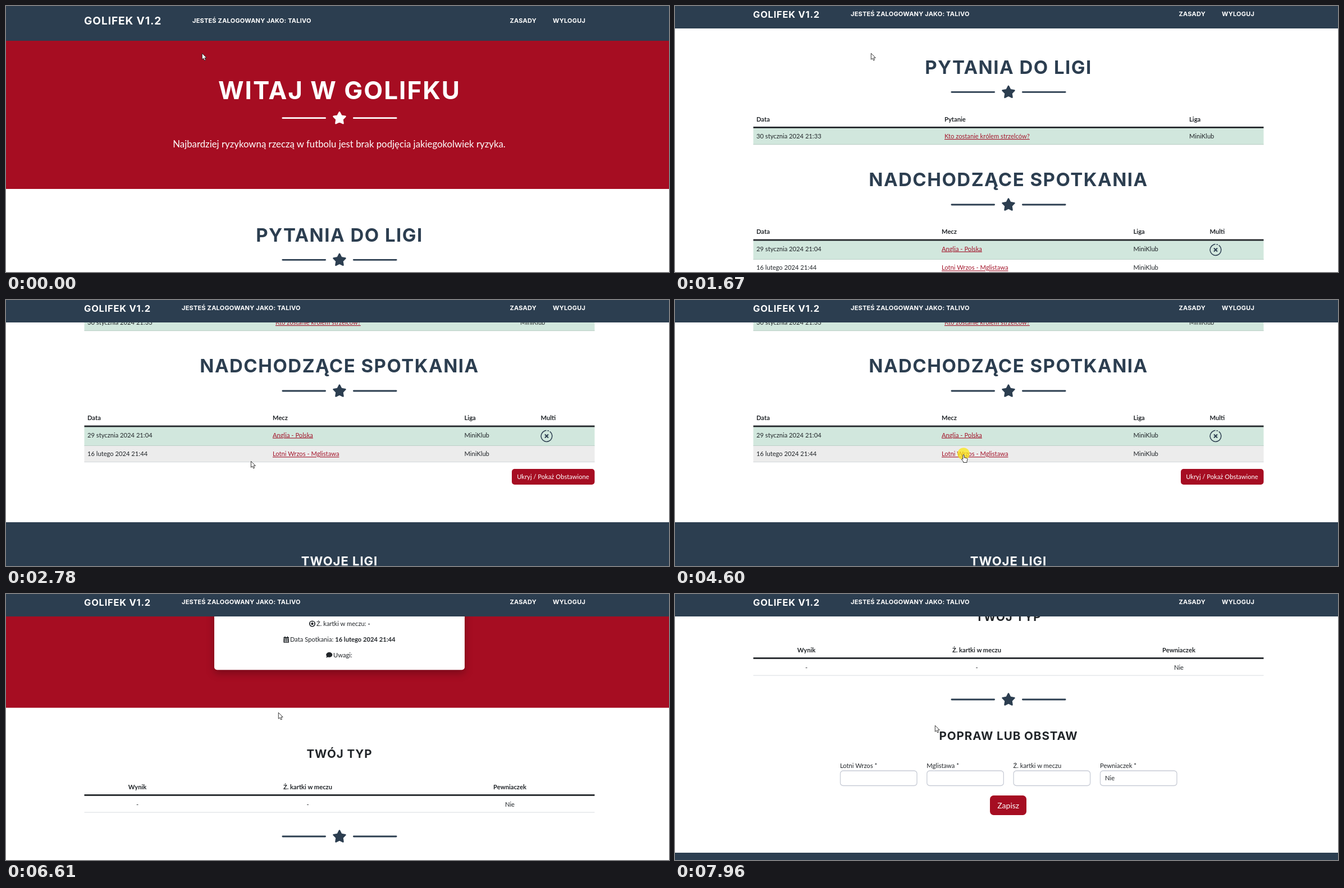
Write an HTML page that moves like this. It is 1181 by 474 pixels and loops after 8 s.

```html
<!DOCTYPE html>
<html lang="pl">
<head>
<meta charset="utf-8">
<style>
  html, body { margin: 0; height: 100%; overflow: hidden; background: #fff; }
  svg { display: block; width: 100vw; height: 100vh; }
  text { font-family: Lato, sans-serif; fill: #212529; white-space: pre; }
  .h { font-family: Inter, sans-serif; font-weight: 700; letter-spacing: .045em; }
  .n { letter-spacing: .02em; }
  .b { font-weight: 700; }
  .m { text-anchor: middle; }
  .navy { fill: #2c3e50; }
  .w { fill: #fff; }
  .a { fill: #a3142a; text-decoration: underline; }
  .red { fill: #a60d22; }
  .card { filter: drop-shadow(0 6px 7px #0004); }
</style>
</head>
<body>
<svg id="stage" viewBox="0 0 1181 474"></svg>
<script>
const LOOP = 8000, OPENED = 5010;
const NAVY = '#2c3e50', INK = '#212529';
const LEAGUE = 'MiniKlub', HOME = 'Lotni Wrzos', AWAY = 'Mglistawa';

// Markup helpers
const text = (x, y, str, cls = '', size = 11.2, id = '') =>
  `<text id="${id}" x="${x}" y="${y}" class="${cls}" font-size="${size}">${str}</text>`;
const rect = (x, y, w, h, fill, more = '') =>
  `<rect x="${x}" y="${y}" width="${w}" height="${h}" fill="${fill}" ${more}/>`;
const button = (x, y, w, h, r) => rect(x, y, w, h, '', `class="red" rx="${r}"`);
const heading = (y, str, size, cls = '') => text(594, y, str, `h m ${cls}`, size);

function divider(y, color) {
  const points = [...Array(10)].map((_, i) => {
    const r = i % 2 ? 5.7 : 11, a = (i / 5 - .5) * Math.PI;
    return [594 + r * Math.cos(a), y + .6 + r * Math.sin(a)].map(v => v.toFixed(2));
  }).join(' ');
  return rect(491.5, y - 1.4, 78.5, 2.8, color, 'rx="1.4"') +
    rect(618, y - 1.4, 78.5, 2.8, color, 'rx="1.4"') +
    `<polygon points="${points}" fill="${color}" stroke="${color}" stroke-width="2.6" stroke-linejoin="round"/>`;
}

const headLine = y => rect(139.5, y, 909, 2.8, INK);
const cells = (y, xs, words, cls) => words.map((s, i) => text(xs[i], y, s, cls)).join('');

// Table rows that react to the mouse: top, bottom, colour, hover colour, border
const rows = [
  [517, 546, '#d1e7dd', '#c9dfd5', '#bcd0c7'],
  [717, 751, '#d1e7dd', '#c9dfd5', '#bcd0c7'],
  [751, 780, '#fff', '#ececec', '#d6dadd'],
];
const rowBands = rows.map(([top, bottom, fill, , line], i) =>
  rect(139.5, top, 909, bottom - top, fill, `id="row${i}"`) +
  rect(139.5, bottom - 1, 909, 1.2, line)).join('');

const Q = [145, 480, 916], M = [145, 475, 816.5, 952.5];

const multiIcon = `<g transform="translate(963 733.5)" fill="none" stroke="${NAVY}">
  <circle r="9.9" stroke-width="1.5" stroke-dasharray="50 2 2.5 2 5.7" transform="rotate(-24)"/>
  <path d="M-3-3L3 3M3-3L-3 3" stroke-width="2"/></g>`;

const home = rect(0, 0, 1181, 326, '', 'class="red"') +
  heading(166, 'WITAJ W GOLIFKU', 44, 'w') +
  divider(199.7, '#fff') +
  text(593.5, 252, 'Najbardziej ryzykowną rzeczą w futbolu jest brak podjęcia jakiegokolwiek ryzyka.', 'm w', 16.8) +
  heading(420, 'PYTANIA DO LIGI', 33, 'navy') + divider(452.3, NAVY) +
  rowBands +
  cells(504.5, Q, ['Data', 'Pytanie', 'Liga'], 'b') + headLine(514) +
  cells(535, Q, ['30 stycznia 2024 21:33', '', LEAGUE]) +
  text(480, 535, 'Kto zostanie królem strzelców?', 'a') +
  heading(620, 'NADCHODZĄCE SPOTKANIA', 33, 'navy') + divider(653, NAVY) +
  cells(704.7, M, ['Data', 'Mecz', 'Liga', 'Multi'], 'b') + headLine(714.6) +
  cells(735.5, M, ['29 stycznia 2024 21:04', '', LEAGUE]) +
  text(475, 735.5, 'Anglia - Polska', 'a') + multiIcon +
  cells(769.3, M, ['16 lutego 2024 21:44', '', LEAGUE]) +
  text(475, 769.3, `${HOME} - ${AWAY}`, 'a') +
  button(901, 792, 147.5, 28, 5) +
  text(974.5, 810, 'Ukryj / Pokaż Obstawione', 'm w') +
  rect(0, 887, 1181, 400, NAVY) + heading(964, 'TWOJE LIGI', 22, 'w');

const ballIcon = `<g transform="translate(545.5 369)"><circle r="4.8" fill="#fff" stroke="${INK}" stroke-width="1.5"/>
  <path d="M0-2.4L2.3-.7 1.4 2H-1.4L-2.3-.7ZM-2-4.8H2L0-3.2ZM4.8-2V1.6L3.4 0ZM-4.8-2V1.6L-3.4 0ZM2 4.4L4 2.6 2.2 2.6ZM-2 4.4L-4 2.6-2.2 2.6Z" fill="${INK}"/></g>`;
const calendarIcon = rect(494.3, 393, 9.8, 9.8, INK, 'rx="1"') +
  rect(496.2, 391.5, 1.5, 3, INK) + rect(500.8, 391.5, 1.5, 3, INK) +
  `<path d="M494.3 395.6h9.8M495.3 398.2h8M495.3 400.6h8M497.6 396v6M500.8 396v6" stroke="#fff" stroke-width=".7"/>`;
const commentIcon = `<path d="M570.2 424.3a5.6 4.5 0 1 1 3 4q-1.300 1.200-3 1.200q1-1.300 .9-2.700q-.9-1.100-.9-2.500Z" fill="${INK}"/>`;

const C = [234, 537.5, 897.5], F = [294, 448.3, 602.6, 757];
const match = rect(0, 0, 1181, 518.7, '', 'class="red"') +
  heading(150, 'WYNIK MECZU', 22, 'w') + divider(186, '#fff') +
  rect(371, 236.3, 446, 215, '#fff', 'rx="5" class="card"') +
  `<path class="red" d="M372.500 269V241.300q0-3.500 3.500-3.500H812q3.500 0 3.500 3.500V269Z"/>` +
  text(478.5, 259, HOME, 'h n m w', 16.6) + text(708.5, 259, AWAY, 'h n m w', 16.6) +
  rect(474, 312, 15, 4, INK) + rect(698.5, 312, 15, 4, INK) +
  ballIcon + text(553, 373, 'Ż. kartki w meczu: <tspan class="b">-</tspan>') +
  calendarIcon + text(506, 401, 'Data Spotkania: <tspan class="b">16 lutego 2024 21:44</tspan>') +
  commentIcon + text(583, 429, 'Uwagi:') +
  heading(608, 'TWÓJ TYP', 20.6) +
  cells(663.5, C, ['Wynik', 'Ż. kartki w meczu', 'Pewniaczek'], 'b m') + headLine(673) +
  cells(694.5, C, ['-', '-', 'Nie'], 'm') + rect(139.5, 704.5, 909, 1.2, '#dee2e6') +
  divider(748, NAVY) +
  heading(820, 'POPRAW LUB OBSTAW', 20.6) +
  cells(870, F, [HOME + ' *', AWAY + ' *', 'Ż. kartki w meczu', 'Pewniaczek *']) +
  F.map(x => rect(x + .5, 875, 136.5, 26.5, '#fff', 'rx="5" stroke="#c8ccd6" stroke-width="1.3"')).join('') +
  text(766, 892, 'Nie') +
  button(561, 919, 65, 35, 6.5) + text(593.7, 942, 'Zapisz', 'm w', 14) +
  rect(0, 1021, 1181, 400, NAVY);

const nav = rect(0, 0, 1181, 62, NAVY, 'id="bar"') +
  text(139, 33, 'GOLIFEK V1.2', 'h w', 19.2, 'brand') +
  text(332, 29.5, 'JESTEŚ ZALOGOWANY JAKO: TALIVO', 'h n w link', 11, 'user') +
  text(897.5, 29.5, 'ZASADY', 'h n w link', 11) +
  text(974, 29.5, 'WYLOGUJ', 'h n w link', 11);

const cursor = `<g id="cursor" fill="#fff" stroke="#222" stroke-width=".9" stroke-linejoin="round">
  <path id="arrow" d="M.3.300V11.300L2.800 9.100 4.500 13 6.500 12.200 4.800 8.300H8.200Z"/>
  <path id="hand" d="M-1.200 1q0-1.300 1.200-1.300T1.200 1V5l1.500.1 1.700.400 1.600.600Q7 6.500 7 8L6 11.500V13.500H-.3V12L-3.200 8.500q-.7-1.200.200-1.600T-1.200 8Z"/>
  <path id="beam" d="M-2-5h1.500L0-4.500.500-5H2M0-4.500V4.500M-2 5h1.500L0 4.500.500 5H2" fill="none"/></g>`;

const stage = document.getElementById('stage');
stage.innerHTML = `<g id="home">${home}</g><g id="match">${match}</g>${nav}
  <circle id="click" cx="514" cy="274" r="10.800" fill="#fbe714" opacity=".75"/>${cursor}`;
const $ = id => document.getElementById(id);
const show = (id, on) => $(id).setAttribute('display', on ? 'inline' : 'none');
const links = document.querySelectorAll('.link');

// Keyframes: time first, then values
const homeScroll = [[1150, 0], [1300, 80], [1670, 299], [2000, 452], [2170, 491]];
const matchScroll = [[6050, 0], [6220, 96], [6610, 315], [6900, 460], [7030, 490], [7270, 490], [7500, 560]];
const mousePath = [[2400, 349, 84], [2780, 436, 287], [3180, 499, 297], [3420, 508, 252], [3660, 514, 276],
  [5500, 514, 276], [5810, 485, 211], [7860, 485, 211], [7960, 463, 234]];

function along(keys, t) {
  const i = keys.findIndex(k => k[0] > t);
  if (i === 0) return keys[0].slice(1);
  if (i < 0) return keys[keys.length - 1].slice(1);
  const [a, b] = [keys[i - 1], keys[i]], p = (t - a[0]) / (b[0] - a[0]);
  return a.slice(1).map((v, j) => v + (b[j + 1] - v) * p);
}

function draw(t) {
  const onHome = t < OPENED;
  const keys = onHome ? homeScroll : matchScroll;
  const scroll = Math.round(along(keys, t)[0]);
  const [x, y] = along(mousePath, t), pageY = y + scroll;

  show('home', onHome);
  show('match', !onHome);
  $(onHome ? 'home' : 'match').setAttribute('transform', `translate(0 ${-scroll})`);

  // The bar shrinks as soon as the page leaves its top
  const p = Math.min(1, Math.max(0, (t - keys[0][0]) / 300));
  const k = 1 - (1 - p) ** 2.5;
  $('bar').setAttribute('height', 62 - 22 * k);
  $('brand').setAttribute('y', 33 - 12.5 * k);
  $('brand').setAttribute('font-size', 19.2 - 2.7 * k);
  $('user').setAttribute('x', 332 - 19 * k);
  links.forEach(l => l.setAttribute('y', 29.5 - 11.3 * k));

  rows.forEach(([top, bottom, fill, hover], i) =>
    $('row' + i).setAttribute('fill', pageY >= top && pageY < bottom ? hover : fill));

  const hand = onHome && x > 475 && x < 593 && pageY > 758 && pageY < 773;
  const beam = !onHome && pageY > 285 && pageY < 340;
  show('hand', hand);
  show('beam', beam);
  show('arrow', !hand && !beam);
  show('click', t >= 4600 && t < 4670);
  $('cursor').setAttribute('transform', `translate(${x} ${y})`);
}

const start = performance.now();
function tick() {
  draw((performance.now() - start) % LOOP);
  requestAnimationFrame(tick);
}
tick();
</script>
</body>
</html>
```
